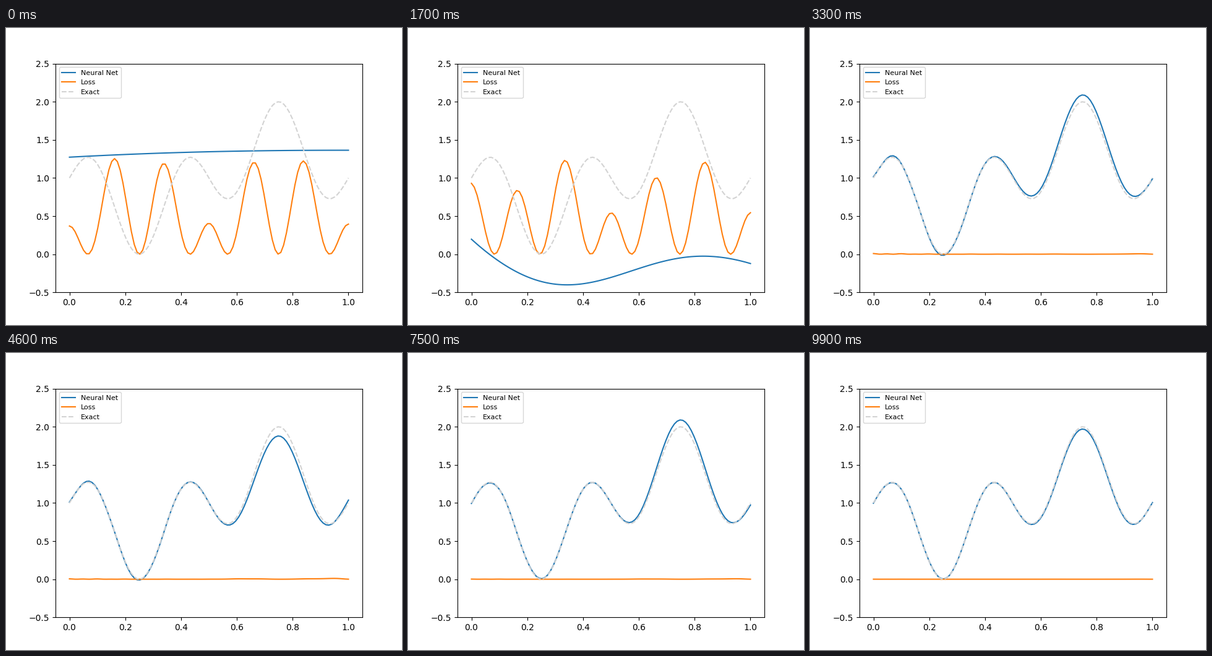
A matplotlib script for the animation above (10 s loop, 640 by 480 pixels).

```python
import numpy as np
import matplotlib.pyplot as plt
from matplotlib.animation import FuncAnimation

FRAMES = 100
INTERVAL = 100
POINTS = 100
SUB = 10
DIP, FIT = 17, 33  # frames of the low point and of the first close fit

# Fine grid for slopes; every SUB-th sample is drawn.
x = np.linspace(0, 1, (POINTS - 1) * SUB + 1)
exact = 1 + np.cos(4 * np.pi * x) * np.sin(2 * np.pi * x)


def smooth(t):
    t = np.clip(t, 0, 1)
    return t * t * (3 - 2 * t)


def integrate(start, slope):
    steps = (slope[1:] + slope[:-1]) / 2 * np.diff(x)
    return start + np.concatenate([[0], np.cumsum(steps)])


untrained = 1.273 + 0.091 * (1 - (1 - x) ** 2.2)

# Falls to x = 0.343, then rises to x = 0.83.
steepness = 11.8 - 2 * x + 10 * np.abs(np.sin(np.pi * x)) ** 1.2
dip = integrate(0.197, (x - 0.343) * (0.83 - x) * steepness)

# Remaining error: a swing of the right-hand peak plus a fading ripple.
peak = np.exp(-((x - 0.76) / 0.16) ** 2) - 0.35 * np.exp(-((1 - x) / 0.06) ** 2)
ripple = np.cos(4 * np.pi * x) - np.sin(20 * np.pi * x) * np.exp(-4 * x)
KEYS = [FIT, 46, 57, 75, 99]
SWING = [0.105, -0.11, -0.034, 0.084, -0.033]
RIPPLE = [0.015, 0.011, 0.006, -0.006, -0.003]


def fitted(frame):
    return (exact + np.interp(frame, KEYS, SWING) * peak
            + np.interp(frame, KEYS, RIPPLE) * ripple)


def network(frame):
    if frame < DIP:
        return untrained + (dip - untrained) * np.sin(frame / DIP * np.pi / 2)
    if frame < FIT:
        # The fit settles from left to right.
        s = (frame - DIP) / (FIT - DIP)
        return dip + (fitted(FIT) - dip) * smooth(1.3 * s - 0.3 * x)
    return fitted(frame)


def residual_loss(net):
    return np.gradient(net - exact, x, edge_order=2) ** 2 / POINTS


fig, ax = plt.subplots(figsize=(6.4, 4.8), dpi=100)
xs = x[::SUB]
net_line, = ax.plot(xs, untrained[::SUB], color="tab:blue", label="Neural Net")
loss_line, = ax.plot(xs, residual_loss(untrained)[::SUB], color="tab:orange",
                     label="Loss")
ax.plot(xs, exact[::SUB], "--", color="lightgray", label="Exact")
ax.set_xlim(-0.05, 1.05)
ax.set_ylim(-0.5, 2.5)
ax.legend(loc="upper left", fontsize=8)


def update(frame):
    net = network(frame)
    net_line.set_ydata(net[::SUB])
    loss_line.set_ydata(residual_loss(net)[::SUB])
    return net_line, loss_line


anim = FuncAnimation(fig, update, frames=FRAMES, interval=INTERVAL,
                     repeat=True, repeat_delay=0)
plt.show()
```
